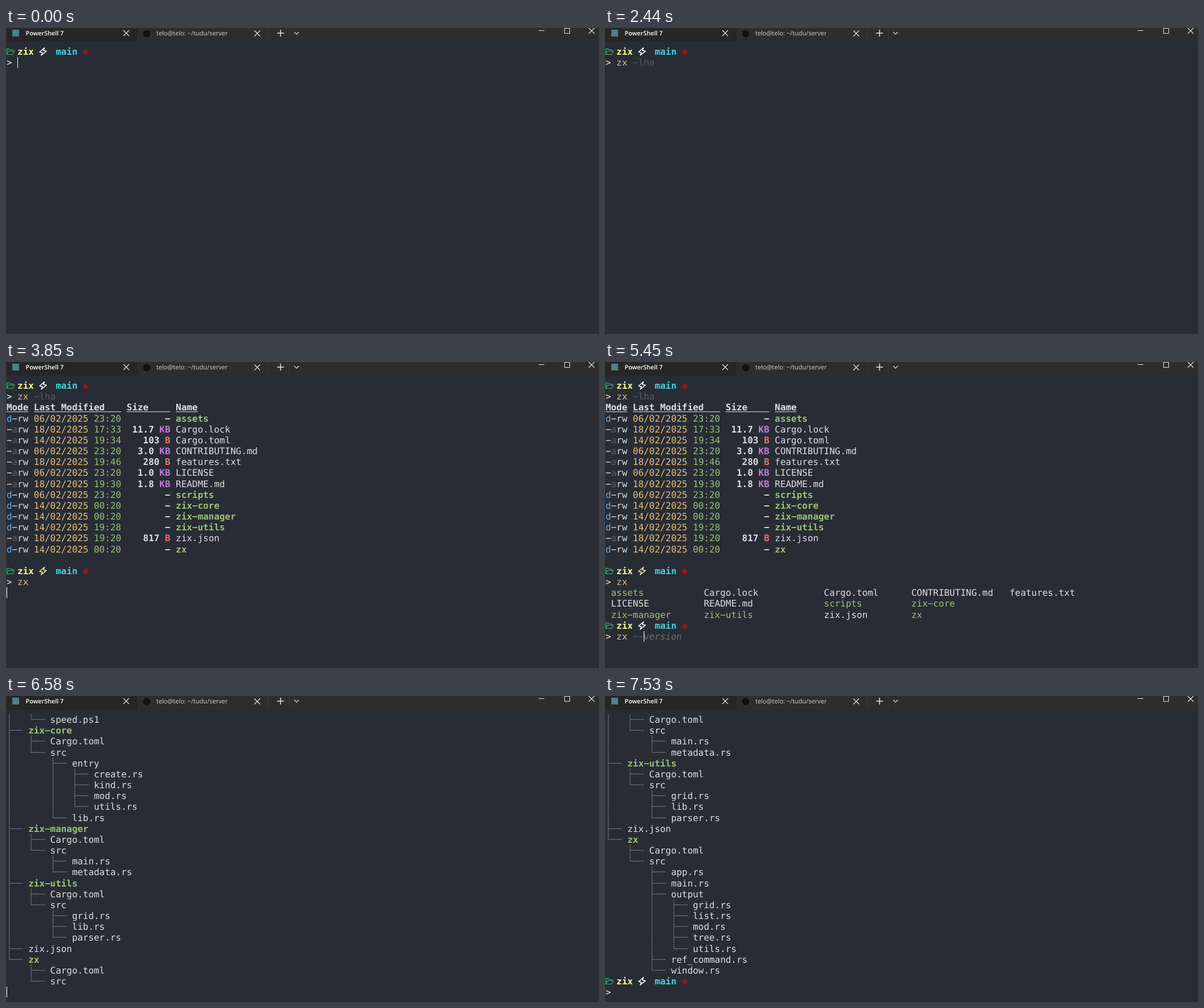
Recreate the animation shown at these times as an HTML page. Size 1041 px wide and 538 px high, loop 8000 ms.

```html
<!DOCTYPE html>
<html lang="en">
<head>
<meta charset="utf-8">
<title>Terminal</title>
<style>
html, body { margin: 0; width: 100%; height: 100%; overflow: hidden; background: #282c34; }
#bar { position: absolute; left: 0; top: 0; width: 1041px; height: 24px; background: #2d2d2d; color: #d0d0d0; font: 11px/20px "Open Sans", "Noto Sans", sans-serif; text-rendering: geometricPrecision; }
#bar span { position: absolute; top: 0; white-space: pre; }
#bar .on { left: 34.5px; font-size: 10.8px; font-weight: 600; color: #fff; }
#bar .off { left: 264px; }
#bar svg { position: absolute; left: 0; top: 0; }
#term { position: absolute; left: .9px; top: 32px; color: #dcdfe4; white-space: pre; text-rendering: geometricPrecision; font: 15.93px/19.18px "DejaVu Sans Mono", monospace; font-variant-ligatures: none; }
#term div { position: relative; height: 19.18px; }
#term svg { position: absolute; left: -.9px; top: 0; }
#cur { position: absolute; width: 1px; height: 19px; background: #fff; }
b { font-weight: 700; }
u { text-underline-offset: 1.5px; text-decoration-thickness: 1px; }
i { font-style: italic; color: #6c6f74; }
.w { color: #f2f2f2; }
.y { color: #e5c07b; }
.z { color: #c4b89c; }
.g { color: #98c379; }
.b { color: #61afef; }
.m { color: #c678dd; }
.r { color: #e0756e; }
.d { color: #565b64; }
.dir { color: #fbf98f; }
.git { color: #45d3e3; }
.lit { color: #f7f0b4; }
.guide { display: inline-block; height: 19.18px; vertical-align: top; color: #636975; transform: scaleY(1.04); }
</style>
</head>
<body>
<div id="bar">
  <svg width="1041" height="24" fill="none" stroke="#e8e8e8" stroke-width="1.1">
    <path d="M0 0H231V24H0Z" fill="#262626" stroke="none"/>
    <path d="M460.5 0V20M497.5 0V20" stroke="#3b3b3b" stroke-width="1"/>
    <rect x="11" y="3" width="12" height="12" fill="#4f7f88" stroke="none"/>
    <circle cx="247" cy="10" r="6.5" fill="#111" stroke="none"/>
    <path d="M206 4l10 10m0-10l-10 10M436 4.500l10 10m0-10l-10 10M1023 0l10 10m0-10l-10 10"/>
    <path d="M476 9H488M482 3V15" stroke-width="1.5"/>
    <path d="M506 7l4 4 4-4" stroke-width="1.2"/>
    <path d="M935 4.500H945M980.500 .5H989.500V9.500H980.500Z" stroke-width="1"/>
  </svg>
  <span class="on">PowerShell 7</span>
  <span class="off">telo@telo: ~/tudu/server</span>
</div>
<div id="term"></div>
<div id="cur"></div>
<script>
const CELL = 9.59, ROW = 19.18, ROWS = 26, TOP = 32, LOOP = 8000;
const term = document.getElementById('term');
const cur = document.getElementById('cur');
const DIRS = ['assets', 'scripts', 'zix-core', 'zix-manager', 'zix-utils', 'zx'];

// The terminal font's hyphen is as wide as a minus sign.
const dash = s => s.replace(/-/g, '\u2212');
const el = (cls, s, tag = 'span') => `<${tag} class="${cls}">${dash(s)}</${tag}>`;
const bold = (cls, s) => el(cls, s, 'b');

function promptLine(lit) {
  const bolt = lit ? '#f7f0b4' : '#fff', red = lit ? '#d00808' : '#b01515';
  return `<svg width="150" height="19" fill="none" stroke-linejoin="round">
<path d="M1.600 14.500V4.600H5.500L7 6.200H12V8.500M1.600 14.500L4.400 8.500H14.500L11.700 14.500Z" stroke="#3fb56c" stroke-width="1.100"/>
<path d="M67.500 2.800L59 10.200L64 11.200L61.800 16L71 8.700L65.700 7.600Z" stroke="${bolt}" stroke-width="1.500"/>
<circle cx="140" cy="10.500" r="4.300" stroke="${red}" stroke-width="1.100"/><circle cx="140" cy="10.500" r="2.700" fill="${red}"/>
</svg>  ${bold('dir', 'zix')}    ${bold('git', 'main')}`;
}

function inputLine(text, hint, lit) {
  const [cmd, arg] = text.split(' ');
  let out = el(lit ? 'lit' : 'w', '&gt;') + ' ' + el('z', cmd.slice(0, 1)) + el('y', cmd.slice(1));
  if (arg !== undefined) out += ' ' + el(arg === '-' ? 'w' : 'd', arg);
  return out + el('', hint, 'i');
}

function listLines() {
  const head = ['Mode', 'Last Modified   ', 'Size    ', 'Name'].map(s => `<b><u>${s}</u></b>`).join(' ');
  const files = `06 23:20 - assets
18 17:33 11.7KB Cargo.lock
14 19:34 103B Cargo.toml
06 23:20 3.0KB CONTRIBUTING.md
18 19:46 280B features.txt
06 23:20 1.0KB LICENSE
18 19:30 1.8KB README.md
06 23:20 - scripts
14 00:20 - zix-core
14 00:20 - zix-manager
14 19:28 - zix-utils
18 19:20 817B zix.json
14 00:20 - zx`.split('\n').map(line => {
    const [day, time, size, name] = line.split(' ');
    const isDir = size === '-';
    const unit = isDir ? '' : size.replace(/[\d.]+/, '');
    const num = isDir ? '-' : parseFloat(size).toFixed(size.includes('.') ? 1 : 0) + ' ';
    const mode = isDir ? el('b', 'd') + dash('-rw') : dash('-') + el('d', 'a') + 'rw';
    return `${mode} ${el('y', day + '/02/2025')} ${el('g', time)} ` +
      bold('', num.padStart(8 - unit.length)) + bold(unit === 'KB' ? 'm' : 'r', unit) + ' ' +
      (isDir ? bold('g', name) : name);
  });
  return [head, ...files, ''];
}

function gridLines() {
  const widths = [17, 22, 16, 18, 12];
  return ['assets Cargo.lock Cargo.toml CONTRIBUTING.md features.txt',
    'LICENSE README.md scripts zix-core',
    'zix-manager zix-utils zix.json zx'].map(row => ' ' + row.split(' ').map((name, i) =>
      el(DIRS.includes(name) ? 'g' : '', name.padEnd(widths[i]))).join(''));
}

function treeLines() {
  const items = `assets
Cargo.lock
Cargo.toml
CONTRIBUTING.md
features.txt
LICENSE
README.md
scripts
 speed.ps1
zix-core
 Cargo.toml
 src
  entry
   create.rs
   kind.rs
   mod.rs
   utils.rs
  lib.rs
zix-manager
 Cargo.toml
 src
  main.rs
  metadata.rs
zix-utils
 Cargo.toml
 src
  grid.rs
  lib.rs
  parser.rs
zix.json
zx
 Cargo.toml
 src
  app.rs
  main.rs
  output
   grid.rs
   list.rs
   mod.rs
   tree.rs
   utils.rs
  ref_command.rs
  window.rs`.split('\n').map(s => ({ name: s.trim(), depth: s.search(/\S/) }));
  const more = (i, depth) => {
    const next = items.slice(i + 1).find(it => it.depth <= depth);
    return !!next && next.depth === depth;
  };
  return items.map(({ name, depth }, i) => {
    let guide = '';
    for (let k = 0; k < depth; k++) guide += more(i, k) ? '│   ' : '    ';
    guide += more(i, depth) ? '├── ' : '└── ';
    return el('guide', guide) + (!depth && DIRS.includes(name) ? bold('g', name) : dash(name));
  });
}

// Build the session once; the cursor always sits on the last line.
const buf = [''], states = [];
let lit = false;
function mark(t, col = -1) {
  const view = buf.slice(-ROWS);
  states.push({ t, col, row: view.length - 1, html: view.map(l => `<div>${l}</div>`).join('') });
}
function print(lines) { buf.splice(-1, 1, ...lines, ''); }
function setLast(line) { buf[buf.length - 1] = line; }
function prompt(t, col) {
  print([promptLine(lit)]);
  setLast(inputLine('', '', lit));
  mark(t, col);
}
function type(t, text, hint = '') {
  setLast(inputLine(text, hint, lit));
  mark(t, text.length + 2);
}
function enter(t, text) {
  setLast(inputLine(text, '', lit));
  buf.push('');
  mark(t, 0);
}

prompt(0, 2);
type(200, 'z', 'x -lha');
type(340, 'zx', ' -lha');
type(600, 'zx ', '-lha');
mark(1070);
type(1130, 'zx -', 'lha');
mark(1460);
type(1530, 'zx -l', 'ha');
type(1710, 'zx -lh', 'a');
type(1840, 'zx -lha');
enter(1910, 'zx -lha');
mark(2440);
print(listLines());
mark(2840, 0);

lit = true;
prompt(3040);
type(3300, 'z', 'x -lha');
type(3370, 'zx', ' -lha');
mark(3630);
type(3700, 'zx ', '-lha');
enter(3850, 'zx ');
print(gridLines());
mark(3970, 0);

lit = false;
prompt(4180, 2);
mark(4510);
type(4710, 'z', 'x -lha');
type(4780, 'zx', ' -lha');
mark(4980);
type(5050, 'zx ', '-lha');
type(5320, 'zx -', 'lha');
type(5450, 'zx --', 'version');
type(5720, 'zx --t', 'ree');
type(5780, 'zx --tr', 'ee');
type(5980, 'zx --tre', 'e');
type(6110, 'zx --tree');
enter(6380, 'zx --tree');

const tree = treeLines();
let shown = 0;
for (const [t, end] of [[6510, 9], [6580, -10], [6650, -5], [6720, tree.length]]) {
  print(tree.slice(shown, end));
  shown = end;
  mark(t, 0);
}
mark(6980);
print([promptLine(false)]);
mark(7460);
setLast(inputLine('', '', false));
mark(7530);

let now = null, html = '';
const start = performance.now();
function draw() {
  const t = (performance.now() - start) % LOOP;
  const s = states.filter(x => x.t <= t).pop();
  if (s !== now) {
    now = s;
    if (s.html !== html) term.innerHTML = html = s.html;
    cur.style.display = s.col < 0 ? 'none' : 'block';
    cur.style.left = Math.floor(1.1 + CELL * s.col) + 'px';
    cur.style.top = Math.floor(TOP + ROW * s.row) + 'px';
  }
  requestAnimationFrame(draw);
}
draw();
</script>
</body>
</html>
```
